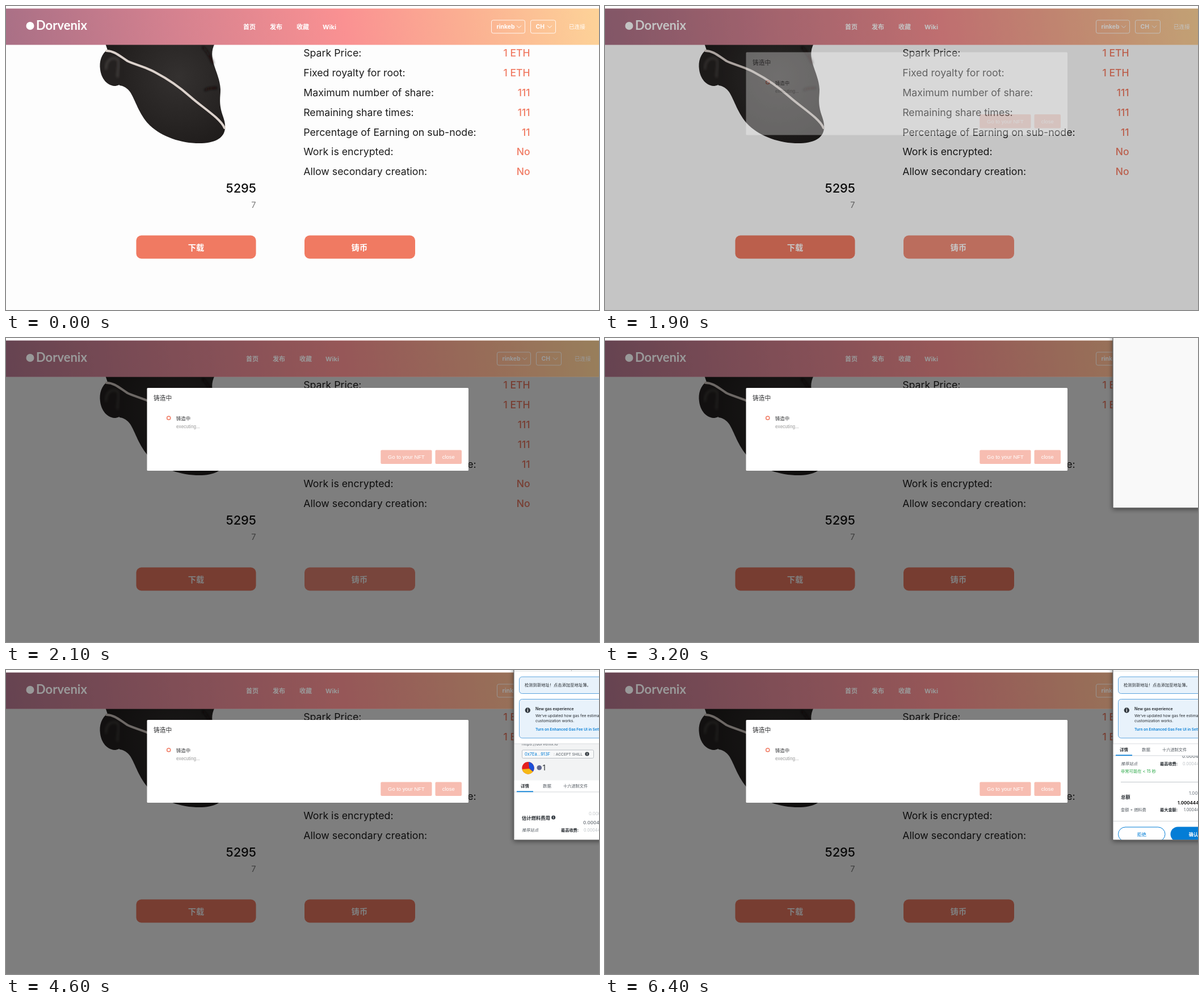
An HTML page for the animation above (6500 ms loop, 1045 by 536 pixels).

```html
<!DOCTYPE html>
<html lang="zh-CN">
<head>
<meta charset="utf-8">
<title>Mint dialog</title>
<style>
html, body { margin: 0; width: 100%; height: 100%; overflow: hidden; background: #fff; }
svg { display: block; width: 1045px; height: 536px; }
text { font-family: Inter, "Noto Sans CJK SC", "Noto Sans CJK", sans-serif; white-space: pre; }
.arial { font-family: "Liberation Sans", sans-serif; }
.logo { font-family: Lato, sans-serif; }
</style>
</head>
<body>
<svg id="stage" viewBox="0 0 1045 536" xmlns="http://www.w3.org/2000/svg">
  <defs>
    <linearGradient id="sky" gradientUnits="userSpaceOnUse" x1="10" y1="100" x2="1035" y2="-40">
      <stop offset="0" stop-color="#aa7086"/>
      <stop offset=".28" stop-color="#d4818f"/>
      <stop offset=".57" stop-color="#fa9192"/>
      <stop offset=".78" stop-color="#fbb092"/>
      <stop offset="1" stop-color="#fdd298"/>
    </linearGradient>
    <radialGradient id="skin" gradientUnits="userSpaceOnUse" cx="305" cy="125" r="130">
      <stop offset="0" stop-color="#343130"/>
      <stop offset=".6" stop-color="#282524"/>
      <stop offset="1" stop-color="#1f1c1b"/>
    </radialGradient>
    <filter id="shade" x="-20%" y="-20%" width="140%" height="140%">
      <feDropShadow dx="0" dy="2" stdDeviation="4" flood-color="#000" flood-opacity=".5"/>
    </filter>
    <filter id="soft"><feGaussianBlur stdDeviation="2"/></filter>
    <clipPath id="pane"><rect x="895" y="130" width="150" height="169.5"/></clipPath>
  </defs>
  <rect width="1045" height="536" fill="#fff"/>
  <rect y="5" width="1045" height="531" fill="#fdfdfd"/>
  <g id="page"></g>
  <rect id="dim" y="68" width="1045" height="468"/>
  <g id="head"></g>
  <rect id="dimHead" y="4.5" width="1045" height="64"/>
  <g id="dialog"></g>
  <g id="popup"></g>
</svg>
<script>
const $ = id => document.getElementById(id);
const CORAL = '#f07a62', HOVER = '#f18c78', BLUE = '#037dd6';

const text = (x, y, size, fill, str, extra = '') =>
  `<text x="${x}" y="${y}" font-size="${size}" fill="${fill}" ${extra}>${str}</text>`;
const rect = (x, y, w, h, fill, extra = '') =>
  `<rect x="${x}" y="${y}" width="${w}" height="${h}" fill="${fill}" ${extra}/>`;
const dot = (x, y, r, fill, extra = '') =>
  `<circle cx="${x}" cy="${y}" r="${r}" fill="${fill}" ${extra}/>`;
const path = (d, extra) => `<path d="${d}" fill="none" ${extra}/>`;
const info = (x, y, r) => dot(x, y, r, '#333a41') +
  text(x, y + r * .6, r * 1.7, '#fff', 'i', BOLD + MID);
const BOLD = 'font-weight="700" ', SEMI = 'font-weight="600" ', MEDIUM = 'font-weight="500" ';
const MID = 'text-anchor="middle" ', END = 'text-anchor="end" ';

function pageArt() {
  const rows = [
    ['Spark Price:', '1 ETH'], ['Fixed royalty for root:', '1 ETH'],
    ['Maximum number of share:', '111'], ['Remaining share times:', '111'],
    ['Percentage of Earning on sub-node:', '11'],
    ['Work is encrypted:', 'No'], ['Allow secondary creation:', 'No']
  ].map(([label, value], i) => {
    const y = 89.3 + i * 34.8;
    return text(524.2, y, 17.75, '#1c1c1c', label) + text(923.5, y, 17.5, CORAL, value, MEDIUM + END);
  }).join('');
  const bust = `
    <path fill="url(#skin)" d="M175 66H368C362 78 362 88 366 102C371 118 377 130 378 147
      C378 158 376 164 378 178C380 192 387 202 386 214C386 231 371 241 345 242
      C309 243 273 230 252 209C234 190 228 166 219 152C214 145 208 141 200 140Z"/>
    <path fill="#242120" d="M180 76C168 84 164 98 166 112C168 128 178 140 191 141
      C203 141 207 132 208 118L205 82Z"/>
    <path fill="none" stroke="#4a4543" stroke-width="3" filter="url(#soft)"
      d="M176 112C176 96 186 88 197 94C201 104 195 116 197 126"/>
    <path fill="none" stroke="#121110" stroke-width="3" filter="url(#soft)"
      d="M346 72C354 78 360 90 365 102M350 149C358 143 366 146 372 144"/>`;
  const line = path('M177 79C191 79 200 88 214 97C228 104 241 105 263 117C284 128 306 143 325 160C345 178 378 198 385 215',
    'stroke="#dcd2cc" stroke-width="4" stroke-linecap="round"');
  return bust + line + rows +
    text(441, 329, 21.8, '#0c0c0c', '5295', MEDIUM + END) +
    text(440.5, 356, 14.5, '#7b7b7b', '7', END) +
    rect(229.5, 404.5, 211, 41, CORAL, 'rx="9"') +
    rect(526, 404.5, 195, 41, CORAL, 'rx="9" id="mint"') +
    text(335, 430.5, 14.2, '#fff', '下载', BOLD + MID) +
    text(623, 430.5, 14.2, '#fff', '铸币', BOLD + MID);
}

function headArt() {
  const nav = ['首页', '发布', '收藏', 'Wiki'].map((s, i) =>
    text(429 + i * 47, 41, 11, '#fff', s, BOLD + MID)).join('');
  const select = (x, w, s) =>
    rect(x, 25, w, 23, 'none', 'rx="3" stroke="#fff" stroke-opacity=".85"') +
    text(x + 9, 40.2, 10.4, '#fff', s, BOLD) +
    path(`M${x + w - 14.5} 34.5l4 4 4-4`, 'stroke="#fff"');
  return rect(0, 4.5, 1045, 64, 'url(#sky)') +
    dot(42.5, 35, 7, '#fff') +
    text(53, 42, 22, '#fff', 'Dorvenix', BOLD + 'class="logo"') +
    `<g id="nav">${nav}</g><g id="tools">` +
    select(855.5, 59, 'rinkeb') + select(924.5, 44, 'CH') +
    text(992, 40, 9.6, '#fff', '已连接') + '</g>';
}

function dialogArt() {
  const button = (x, w, s) => rect(x, 197.5, w, 24.5, '#f7bdb1', 'rx="2"') +
    text(x + w / 2, 213, 9.4, '#fff', s, MID + 'class="arial"');
  return rect(248.5, 88, 566.5, 146, '#fff', 'rx="1.5"') +
    text(260, 110, 10.8, '#303133', '铸造中') +
    dot(286.7, 141, 3.1, 'none', `stroke="${CORAL}" stroke-width="1.5"`) +
    text(300, 145.2, 8.4, '#303133', '铸造中') +
    text(300, 159, 8.2, '#999', 'executing...', 'class="arial"') +
    button(660.3, 90.2, 'Go to your NFT') + button(756.5, 46.5, 'close');
}

function popupArt() {
  const card = (y, h) => rect(904.5, y, 160, h, '#e8f2fb', 'rx="5" stroke="#5ca4de"');
  const notices = rect(895.5, 0, 150, 299, '#fff') +
    rect(895, 1.5, 150, 1, '#dcdfe2') + rect(996, 0, 1, 2, '#bbb') +
    card(12, 29.5) + text(914, 29.2, 7.3, '#24292e', '检测到新地址！点击添加至地址簿。') +
    card(51.5, 68.5) + info(919.3, 71, 4.7) +
    text(933, 71, 6.9, '#24292e', 'New gas experience', SEMI) +
    text(933, 83.2, 6.8, '#24292e', "We've updated how gas fee estimation and") +
    text(933, 92.4, 6.8, '#24292e', 'customization works.') +
    text(933, 107.2, 6.5, BLUE, 'Turn on Enhanced Gas Fee UI in Settings', SEMI);
  const summary = rect(895.5, 100, 150, 95, '#f2f3f4') +
    text(909, 132.5, 7.4, '#535a61', 'https://dorvenix.io') +
    rect(909.5, 141, 126, 14.5, '#f7f8f9', 'rx="2" stroke="#bbc0c5"') +
    text(914, 151, 7.5, BLUE, '0x7Ea...913F') +
    text(965, 150.6, 6.7, '#535a61', ': ACCEPT SHILL') + info(1024, 148, 3.6) +
    dot(920, 172.8, 10.7, '#e4201f') +
    '<path fill="#1c4fd8" d="M921 162.2A10.7 10.7 0 0 1 928.5 179.3L922 173Z"/>' +
    '<path fill="#f6b915" d="M909.6 175L922 174L928.5 179.3A10.7 10.7 0 0 1 909.6 175Z"/>' +
    dot(939.8, 172.3, 4.3, '#62688f') +
    text(945.5, 177.2, 13, '#24292e', '1');
  const details = rect(895.5, 195, 150, 240, '#fff') +
    text(1027, 256, 7.8, '#c4c7ca', '0.000444') +
    text(909, 263.5, 8.3, '#24292e', '估计燃料费用', BOLD) + info(964.7, 260, 3.5) +
    text(1017, 272.2, 8, '#7c8288', '0.000444', SEMI) +
    text(909, 285.3, 7.3, '#535a61', '推荐站点', 'font-style="italic"') +
    text(978, 285.3, 7.2, '#24292e', '最高收费:', BOLD) +
    text(1018, 285.3, 7.2, '#bbc0c5', '0.00044402') +
    text(909, 297.6, 7.3, '#28a745', '非常可能在 &lt; 15 秒', 'id="speed"') +
    rect(909, 314, 140, 1.2, '#c9cdd1') +
    `<g id="totals">` + text(1029, 337, 8, '#6a737d', '1.000444') +
    text(1009, 353.6, 8, '#000', '1.00044402', SEMI) +
    text(1020, 366, 7, '#535a61', '1.00044402') + '</g>' +
    text(909, 344, 8.3, '#24292e', '总额', BOLD) +
    text(909, 366, 7.2, '#535a61', '金额 + 燃料费') +
    text(978, 366, 7.2, '#24292e', '最大金额:', BOLD) +
    rect(895.5, 383, 150, 1, '#d2d6da') +
    rect(904.5, 394, 82.5, 25, '#fff', `rx="12.5" stroke="${BLUE}"`) +
    text(945.7, 409.5, 8.2, BLUE, '拒绝', MID) +
    rect(996.5, 393.5, 82.5, 26, BLUE, 'rx="13"') +
    text(1037, 409.5, 8.2, '#fff', '确认', BOLD + MID);
  const tabs = rect(895.5, 194.5, 150, 20.5, '#fff') + rect(895.5, 214.5, 150, 1, '#d2d6da') +
    text(907, 207, 7.4, '#24292e', '详情', BOLD) + text(946, 207, 7.4, '#535a61', '数据') +
    text(982, 207, 7.2, '#535a61', '十六进制文件') + rect(900, 213.5, 29, 1.7, BLUE);
  return rect(895, -10, 170, 309.7, '#f9f9f9', 'filter="url(#shade)" stroke="#606060" stroke-width=".8"') +
    `<g id="content">${notices}<g clip-path="url(#pane)">` +
    `<g id="scroll">${summary}${details}</g><g id="tabs">${tabs}</g></g>` +
    rect(895.5, 129.5, 150, 1, '#d9dce0') + '</g>' +
    path('M895 0V299.7H1045', 'stroke="#606060" stroke-width=".8"');
}

$('page').innerHTML = pageArt();
$('head').innerHTML = headArt();
$('dialog').innerHTML = dialogArt();
$('popup').innerHTML = popupArt();

// Linear interpolation through [time, value] pairs
function track(t, keys) {
  if (t <= keys[0][0]) return keys[0][1];
  for (let i = 1; i < keys.length; i++) {
    const [a, u] = keys[i - 1], [b, v] = keys[i];
    if (t <= b) return u + (v - u) * (t - a) / (b - a);
  }
  return keys[keys.length - 1][1];
}
const set = (id, name, value) => $(id).setAttribute(name, value);
const show = (id, on) => set(id, 'visibility', on ? 'inherit' : 'hidden');
const move = (id, x, y) => set(id, 'transform', `translate(${x} ${y})`);

function draw(t) {
  const hover = t >= 500 && t < 1000 || t >= 1200 && t < 3200;
  set('mint', 'fill', hover ? HOVER : CORAL);

  set('dim', 'opacity', track(t, [[1800, 0], [1900, .225], [2000, .46], [2100, .5]]));
  set('dimHead', 'opacity', track(t, [[1800, 0], [1900, .235], [2000, .37], [2100, .4]]));
  const open = t >= 1900;
  move('nav', open ? 5 : 0, 0);
  move('tools', open ? 10 : 0, 0);
  set('dialog', 'opacity', track(t, [[1800, 0], [1900, .33], [2000, .9], [2100, 1]]));
  move('dialog', 0, track(t, [[1900, -6.5], [2000, -1], [2100, 0]]));

  set('popup', 'visibility', t >= 3200 ? 'visible' : 'hidden');
  show('content', t >= 3900);
  const s = track(t, [[4200, -14], [4600, 0], [4800, 64], [5200, 64], [5800, 117]]);
  move('scroll', 0, -s);
  move('tabs', 0, -Math.min(s, 64));
  show('speed', t >= 4700);
  set('totals', 'opacity', t < 5000 ? .45 : 1);
}

const STEP = 100, LOOP = 6500;
function tick() {
  draw(Math.floor(performance.now() % LOOP / STEP) * STEP);
  requestAnimationFrame(tick);
}
tick();
</script>
</body>
</html>
```
